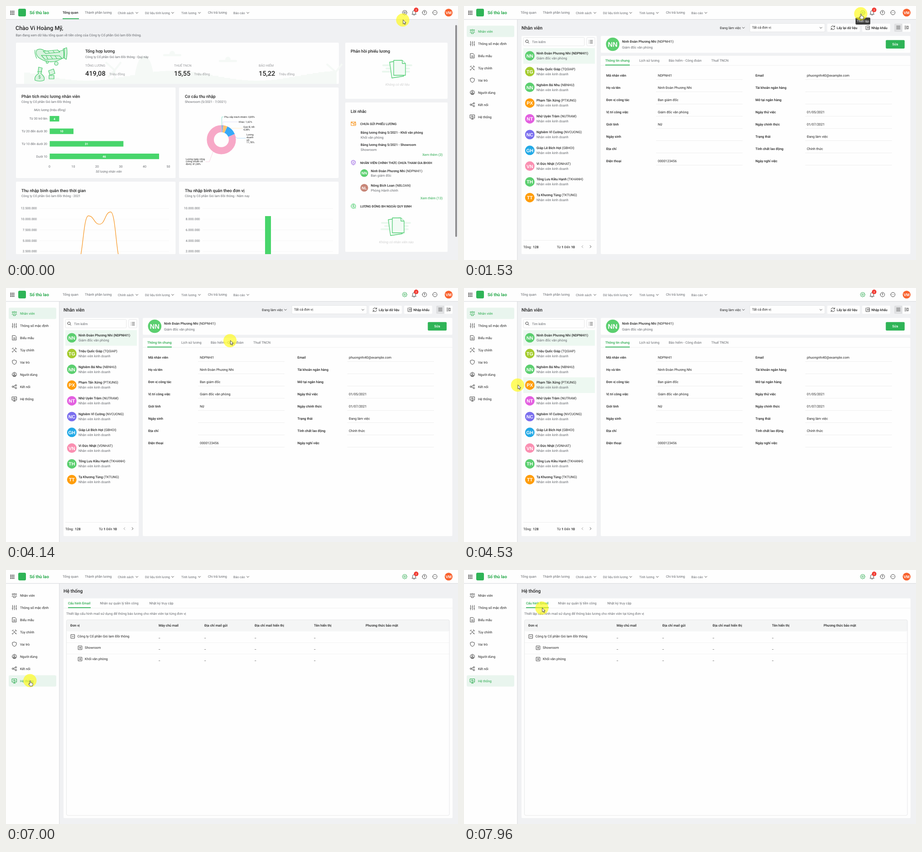
An HTML page for the animation above (8000 ms loop, 998 by 561 pixels).

```html
<!DOCTYPE html>
<html lang="vi">
<head>
<meta charset="utf-8">
<title>Sổ thù lao</title>
<style>
html, body { margin: 0; width: 100%; height: 100%; overflow: hidden; background: #f0f1f3; }
svg { display: block; width: 100vw; height: 100vh; }
text { font-family: Roboto, sans-serif; fill: #232323; text-rendering: geometricPrecision; white-space: pre; }
.m { font-weight: 500; }
.b { font-weight: 700; }
.g { fill: #66696e; }
.l { fill: #98999c; }
.p { fill: #cfcfcf; }
.i { font-style: italic; }
.e { text-anchor: end; }
.c { text-anchor: middle; }
.w { fill: #fff; }
.green { fill: #27a94b; }
.initials { font: bold 1em "Liberation Sans", sans-serif; font-size: inherit; }
.status { font-family: "Open Sans", sans-serif; fill: #3c4043; }
.line { fill: none; stroke: #444; stroke-width: 1; stroke-linecap: round; stroke-linejoin: round; }
.side.active rect, .side.hover rect { fill: #e9f5ee; }
.side rect { fill: none; }
.side.active text { fill: #27a94b; }
.side.active .line, #gear.active { stroke: #27a94b; }
.row { fill: none; }
.row.hover { fill: #edf8f1; }
</style>
</head>
<body>
<svg id="stage" viewBox="0 0 998 561" preserveAspectRatio="none"></svg>
<script>
const GREEN = '#2fb457', MINT = '#48d56b', PAGE = '#f0f1f3', COMPANY = 'Công ty Cổ phần Gió lam Đồi thông';

// Shape helpers; text is placed by the middle of its capitals.
const text = (x, y, s, cls = '', size = 7.4) =>
  `<text x="${x}" y="${(y + size * .355).toFixed(2)}" style="font-size:${size}px" class="${cls}">${s}</text>`;
const rect = (x, y, w, h, fill = '#fefefe', r = 0, extra = '') =>
  `<rect x="${x}" y="${y}" width="${w}" height="${h}" rx="${r}" fill="${fill}" ${extra}/>`;
const disc = (x, y, r, fill, extra = '') => `<circle cx="${x}" cy="${y}" r="${r}" fill="${fill}" ${extra}/>`;
const line = (d, extra = '') => `<path class="line" d="${d}" ${extra}/>`;
const tint = (color, width = 1) => `style="stroke:${color};stroke-width:${width}"`;
const rule = (x1, x2, y, color = '#e4e4e4') => rect(x1, y, x2 - x1, .6, color);
const at = (x, y, body, attrs = '') => `<g transform="translate(${x} ${y})" ${attrs}>${body}</g>`;
const chevron = x => line(`M${x - 2.4} 14l2.4 2.4l2.4-2.4`);
const each = (list, draw) => list.map(draw).join('');
const initials = name => { const w = name.split(' '); return w[0][0] + w.at(-1)[0]; };
const avatar = (x, y, r, fill, name) => disc(x, y, r, fill) + text(x, y + .2, initials(name), 'w c initials', r);
const ring = 'M-4.8 0a4.8 4.8 0 1 0 9.6 0a4.8 4.8 0 1 0-9.6 0';

function header() {
  let dots = '';
  for (let i = 0; i < 9; i++) dots += rect(9.4 + i % 3 * 3.4, 10.5 + (i / 3 | 0) * 3.4, 2.2, 2.2, '#3a3a3a', .5);
  const menus = [[247, 'Chính sách', 289], [307, 'Dữ liệu tính lương', 368], [387, 'Tính lương', 427], [502, 'Báo cáo', 534]];
  let gear = '';
  for (let i = 0; i < 32; i++) {
    const a = i * Math.PI / 16, r = i & 2 ? 4.2 : 5.2;
    gear += `${i ? 'L' : 'M'}${(r * Math.cos(a)).toFixed(2)} ${(r * Math.sin(a)).toFixed(2)}`;
  }
  return rect(0, 29, 998, 1.2, '#dcdde0') + rect(0, 0, 998, 29) + dots + rect(27, 6, 17, 17, GREEN, 3) +
    text(52, 14.8, 'Sổ thù lao', 'b green', 9.5) +
    `<g id="navOn">${text(125, 14.6, 'Tổng quan', 'm')}${rect(125, 27.2, 36, 1.8, GREEN)}</g>` +
    `<g id="navOff">${text(125, 14.6, 'Tổng quan', 'g')}</g>` +
    text(174, 14.6, 'Thành phần lương', 'g') + text(446, 14.6, 'Chi trả lương', 'g') +
    each(menus, ([x, s, c]) => text(x, 15.3, s, 'g', 7.05) + chevron(c)) +
    at(880.3, 14.6, `<path id="gear" class="line" d="${gear}Z M-1.8 0a1.8 1.8 0 1 0 3.6 0a1.8 1.8 0 1 0-3.6 0"/>`) +
    at(901, 15, line('M-4.5 3.3H4.5L3.2 1.3V-1.5a3.2 3.2 0 0 0-6.4 0V1.3Z M-1.2 5h2.4')) +
    disc(905.6, 8.6, 5, '#f0382f') + text(905.6, 8.7, '2', 'w c', 6) +
    at(924, 14.6, line(ring)) + text(924, 14.7, '?', 'c m', 7) +
    at(947, 14.6, line(ring + 'M-2.1 0h.1M0 0h.1M2.1 0h.1')) + avatar(977.3, 14.6, 8.7, '#f9622e', 'Vi Hoàng Mỹ');
}

function sidebar() {
  const items = [
    ['Nhân viên', 'M-1.5-2.8a1.5 1.5 0 1 0 3 0a1.5 1.5 0 1 0-3 0M-5-2.6a1.1 1.1 0 1 0 2.2 0a1.1 1.1 0 1 0-2.2 0M2.8-2.6a1.1 1.1 0 1 0 2.2 0a1.1 1.1 0 1 0-2.2 0M-2.4 4.5V2.5q2.4-3 4.8 0V4.5ZM-5 2.5q0-2 1.8-2M5 2.5q0-2-1.8-2'],
    ['Thông số mặc định', 'M-4-5V0M-4 3V5M0-5V-3M0 0V5M4-5V1M4 4V5M-5.2 1.5h2.4M-1.2-1.5h2.4M2.8 2.5h2.4'],
    ['Biểu mẫu', 'M-4.2-5H1.5L4.2-2.2V5H-4.2ZM-2 0H2M-2 2.5H2'],
    ['Tùy chỉnh', 'M-4.5 4.7L3 -3M4.7 4.7L-3.6-3.6M-5-2.5L-2.5-5M1.8-4.8q2-.8 3 2.8M2 4L4 2M-5 3.2L-3.4 5'],
    ['Vai trò', 'M0-5L4.5-3.3V0Q4 3.5 0 5Q-4 3.5-4.5 0V-3.3Z'],
    ['Người dùng', ring + 'M-1.6-1.4a1.6 1.6 0 1 0 3.2 0a1.6 1.6 0 1 0-3.2 0M-2.6 3V1.6H2.6V3Z'],
    ['Kết nối', 'M-5 0a1.7 1.7 0 1 0 3.4 0a1.7 1.7 0 1 0-3.4 0M1.7-3a1.6 1.6 0 1 0 3.2 0a1.6 1.6 0 1 0-3.2 0M1.7 3a1.6 1.6 0 1 0 3.2 0a1.6 1.6 0 1 0-3.2 0M-1.7-.7L1.8-2.4M-1.7.7L1.8 2.4'],
    ['Hệ thống', 'M-5-4.5H5V2.5H-5ZM-2.5 5H2.5M0 2.5V5M-3-.8H-1.5L-.4-2.8L.8 1L1.6-.8H3']
  ];
  return rect(117, 30, 1.5, 531, '#e3e4e7') + rect(0, 30, 117, 531) + each(items, ([label, icon], i) =>
    `<g class="side">${rect(6, 43.5 + 27 * i, 105, 25, '', 3)}${at(18.5, 56 + 27 * i, line(icon))}${text(31, 56.2 + 27 * i, label)}</g>`);
}

const emptyIcon = (x, y) => at(x, y,
  each([[-34, -8, 66], [-27, -1, 54], [-35, 6, 62]], ([a, b, w]) => rect(a, b - 2, w, 4, '#eaf7ee', 2)) +
  `<g fill="#f2fbf5" stroke="#4fcd72" stroke-width="1.3" stroke-linejoin="round"><path d="M-18-15L8-19L13 16L-13 20Z"/><path d="M-9-19H10L17-12V14H-9Z"/><path d="M10-19V-12H17"/></g>`);

function illustration() {
  const pale = '#f5f9f6';
  const mill = (x, y) => `<path d="M${x} ${y}L${x - 20} ${y - 18}M${x} ${y}L${x + 14} ${y - 18}M${x} ${y}L${x - 15} ${y + 15}M${x} ${y}V172" stroke="${pale}" stroke-width="4"/>`;
  let town = '';
  for (let x = 40; x < 722; x += 13) {
    const h = 7 + 22 * Math.abs(Math.sin(x * 1.7)) ** 2;
    town += rect(x, 172 - h, 13, h, pale);
  }
  const clouds = each([[367, 109], [490, 122]], ([x, y]) => rect(x - 20, y - 3, 40, 5, pale, 2.5) + disc(x, y - 4, 6, pale));
  return `<g>${town}${clouds}${mill(240, 142)}${mill(728, 146)}<path d="M282 172Q288 112 305 110Q323 112 328 172Z" fill="${pale}"/></g>
    <g fill="#d8f3df" stroke="#47c96b" stroke-width="1.2" stroke-linejoin="round">
    <path d="M68 97Q76 93 84 98L104 103L129 97L131 113L113 121Q92 128 72 114Q64 106 68 97Z"/>
    <path d="M126 95L134 92Q136 104 133 118L127 114Q129 104 126 95Z M129 93V115"/>
    <path d="M64 97Q63 106 68 116" fill="none"/>
    <path d="M78 109L118 110L124 116L86 118Z M88 109L93 118M98 110L103 117M108 110L113 117"/>
    <path d="M82 100L114 97L119 102L88 105Z M92 99L96 104M103 98L107 103"/>
    <circle cx="111" cy="127" r="4"/><circle cx="91" cy="124" r="2.5"/>
    <path d="M70 145H79L77 149Q87 157 84 164Q75 168 64 164Q62 155 72 149Z M71 145L72 135L80 137L78 145Z"/>
    <path d="M94 143L105 139L108 149L97 153ZM95 153H106V161H95Z"/></g>` + text(74, 157, '$', 'c green', 9);
}

// Smooth curve with level tangents at every point.
const spline = points => points.reduce((d, [x, y], i) => {
  if (!i) return `M${x} ${y}`;
  const [px, py] = points[i - 1], mid = (px + x) / 2;
  return d + `C${mid} ${py} ${mid} ${y} ${x} ${y}`;
}, '');

function charts() {
  const rows = ['Từ 30 trở lên', 'Từ 20 đến dưới 30', 'Từ 10 đến dưới 20', 'Dưới 10'];
  const bars = each([4, 10, 31, 46], (n, i) => {
    const y = 249 + 27.7 * i;
    return text(91, y, rows[i], 'g e', 7) + rect(96.5, y - 6.1, n * 5.25, 12.2, MINT) + text(96.5 + n * 2.62, y + .2, n, 'w b c', 6.6);
  });
  let start = 0;
  const donut = each([[.85, '#68d4bd'], [1.62, '#a8a5df'], [4.38, '#ffc46e'], [11.78, '#37a9f8'], [81.37, '#f7a8c7']], ([part, color]) => {
    const arc = `<circle r="24.3" pathLength="100" fill="none" stroke="${color}" stroke-width="15.6" stroke-dasharray="${part} 100" stroke-dashoffset="${-start}" transform="rotate(-90)"/>`;
    start += part;
    return arc;
  });
  const labels = [[482, 245, 'Phụ cấp trách nhiệm: 0,85%'], [514, 256, 'Khác: 1,62%'], [524, 267.5, 'Quà lễ, tết:'], [524, 273, '4,38%'],
    [531, 284, 'Lương'], [531, 290, 'doanh'], [531, 295.6, 'số:'], [531, 301, '11,78%'],
    [397, 338, 'Lương ngày công'], [397, 343.5, '(công chuẩn cố'], [397, 349, 'định): 81,38%']];
  const leaders = [['M476.5 263V245H480', '#68d4bd'], ['M479 263V256H512', '#d5d2f0'], ['M484 265L494 270H522', '#ffe2b3'],
    ['M504 286L510 292H529', '#8fcdf9'], ['M457 322L449 344H441', '#f4c6d9']];
  const axis = (x, values, end) => each(values, (v, i) => text(x, 447 + 23.7 * i, v, 'g e', 7) + rule(x + 6, end, 447 + 23.7 * i, '#f2f2f2'));
  const head = (x, y, title, sub) => text(x, y, title, 'm', 9.35) + text(x, y + 12.5, sub, 'g', 7.05);
  return each([[22, 180, 200], [382, 180, 200], [22, 388, 160], [382, 388, 160]], ([x, y, h]) => rect(x, y, 352.5, h, '#fefefe', 2)) +
    head(34, 199.2, 'Phân tích mức lương nhân viên', COMPANY) + text(97, 230, 'Mức lương (triệu đồng)', 'g i c', 7) + bars +
    each([0, 10, 20, 30, 40, 50], n => text(96 + n * 5.25, 355, n, 'g c', 7)) + text(227, 366, 'Số lượng nhân viên', 'g i c', 7) +
    head(395, 199.2, 'Cơ cấu thu nhập', 'Showroom (5/2021 - 7/2021)') + each(leaders, ([d, c]) => line(d, tint(c, .7))) +
    at(475.5, 295.3, donut) + each(labels, ([x, y, s]) => text(x, y, s, '', 5.5)) +
    head(34, 407.2, 'Thu nhập bình quân theo thời gian', COMPANY + ' - 2021') +
    axis(68, ['12.500.000', '10.000.000', '7.500.000', '5.000.000', '2.500.000'], 360) +
    line(spline([[158, 566], [182, 463.3], [206.5, 482], [231, 454.8], [255, 566]]), tint('#f7941d', 1.2)) +
    rect(0, 548, 740, 13, PAGE) +
    head(395, 407.2, 'Thu nhập bình quân theo đơn vị', COMPANY + ' - Năm nay') +
    axis(428, ['10.000.000', '8.000.000', '6.000.000', '4.000.000', '2.000.000'], 722) + rect(572, 464, 13, 84, MINT);
}

function home() {
  const totals = [[175, 'TỔNG LƯƠNG', '419,08', 228], [371, 'THUẾ TNCN', '15,55', 415.5], [558, 'BẢO HIỂM', '15,22', 602.5]];
  const person = (y, color, name, code, unit) => avatar(791, y, 8.6, color, name) +
    text(805.5, y - 5, `<tspan class="m">${name}</tspan> (${code})`) + text(805.5, y + 5.5, unit, 'g');
  return rect(0, 30, 998, 531, PAGE) + text(21, 48.6, 'Chào Vi Hoàng Mỹ,', 'm', 12.5) +
    text(21.5, 64.6, `Bạn đang xem dữ liệu tổng quan về tiền công của ${COMPANY}.`, 'g', 7.35) +
    rect(22, 81, 713, 91, '#fefefe', 2) + illustration() +
    text(175, 99.8, 'Tổng hợp lương', 'm', 9.4) + text(175, 112.3, COMPANY + ' - Quý này', 'g', 7.05) +
    each(totals, ([x, label, n, unit]) => text(x, 131.3, label, 'l', 7.1) + text(x, 148.5, n, 'm', 14.6) + text(unit, 150.8, 'Triệu đồng', 'l', 7.3)) +
    charts() +
    rect(749, 81, 226, 124, '#fefefe', 2) + text(761, 99.8, 'Phản hồi phiếu lương', 'm', 9.2) + emptyIcon(865, 139) + text(864.5, 173.5, 'Không có dữ liệu', 'p i c') +
    rect(749, 213, 226, 330, '#fefefe', 2) + text(761, 232.5, 'Lời nhắc', 'm', 9.2) +
    at(767, 260, line('M-5-4H5V4H-5ZM-5-4L0 0L5-4M1 4V1H6', tint('#f7941d', 1.1))) + text(782, 260.2, 'CHƯA GỬI PHIẾU LƯƠNG', 'm', 7.1) +
    text(783, 279.6, 'Bảng lương tháng 5/2021 - Khối văn phòng', 'm', 7.2) + text(783, 290.6, 'Khối văn phòng', 'g') +
    text(783, 306.8, 'Bảng lương tháng 5/2021 - Showroom', 'm', 7.2) + text(783, 317.8, 'Showroom', 'g') + text(964, 328.3, 'Xem thêm (3)', 'e green') +
    disc(767, 346, 6.8, '#f3edfc') + at(767, 346, line('M0-5L4-3V0Q3.5 3.5 0 5Q-3.5 3.5-4 0V-3ZM0-2V1M0 2.5V2.6', tint('#9056dd'))) +
    text(782, 346.2, 'NHÂN VIÊN CHÍNH THỨC CHƯA THAM GIA BHXH', 'm', 7.1) +
    person(369, '#5bcf6f', 'Ninh Đoàn Phương Nhi', 'NDPNHI1', 'Ban giám đốc') + person(401.5, '#c78678', 'Nông Bích Loan', 'NBLOAN', 'Phòng Hành chính') +
    text(964, 424.3, 'Xem thêm (13)', 'e green') +
    at(767, 442, disc(0, 0, 6.8, '#e6f7eb') + line(ring + 'M3 3L5 5', tint(MINT)) + text(0, 0, '$', 'c green', 7)) +
    text(782, 442.2, 'LƯƠNG ĐÓNG BH NGOÀI QUY ĐỊNH', 'm', 7.1) + emptyIcon(862, 487) + text(862, 521.5, 'Không có nhân viên nào', 'p i c') +
    rect(992, 42, 3.8, 468, '#8c8c8e', 2);
}

const people = [
  ['Ninh Đoàn Phương Nhi', 'NDPNHI1', '#5bcf6f'], ['Triệu Quốc Giáp', 'TQGIAP', '#a5cc2f'], ['Nghiêm Bá Nhu', 'NBNHU', '#5bcf6f'],
  ['Phạm Tấn Xứng', 'PTXUNG', '#ff9d0a'], ['Nhữ Uyên Trâm', 'NUTRAM', '#e35fe0'], ['Nghiêm Vĩ Cường', 'NVCUONG', '#7a6eee'],
  ['Giáp Lê Bích Hợi', 'GBHOI', '#22a9e6'], ['Vi Đức Nhật', 'VDNHAT', '#fa8fb1'], ['Tống Lưu Kiều Hạnh', 'TKHANH', '#5bcf6f'], ['Tạ Khương Tùng', 'TKTUNG', '#ff9d0a']
];
const ROW = 34.8;

function staff() {
  const [lead, code, color] = people[0];
  const left = [['Mã nhân viên', code], ['Họ và tên', lead], ['Đơn vị công tác', 'Ban giám đốc'], ['Vị trí công việc', 'Giám đốc văn phòng'],
    ['Giới tính', 'Nữ'], ['Ngày sinh', ''], ['Địa chỉ', ''], ['Điện thoại', '0000123456']];
  const right = [['Email', 'phuongnhi40@example.com'], ['Tài khoản ngân hàng', ''], ['Mở tại ngân hàng', ''], ['Ngày thử việc', '01/05/2021'],
    ['Ngày chính thức', '01/07/2021'], ['Trạng thái', 'Đang làm việc'], ['Tính chất lao động', 'Chính thức'], ['Ngày nghỉ việc', '']];
  const labels = (x, list, end) => each(list, ([s], i) => text(x, 153 + 27 * i, s, 'm') + rule(x + 110, end, 162.3 + 27 * i));
  const values = (x, list) => each(list, ([, s], i) => text(x, 153 + 27 * i, s));
  const border = 'stroke="#dddee0" stroke-width=".7"';
  const bars = 'M-4-3H4M-4 0H4M-4 3H4';
  const person = ([name, id, fill], i) => {
    const y = 110 + ROW * i;
    return `<rect class="row person" x="131" y="${y - 17}" width="158" height="34.5"/>` + avatar(145.3, y, 10.5, fill, name) +
      text(160, y - 5.6, `<tspan class="m">${name}</tspan> (${id})`, i ? '' : 'm') +
      text(160, y + 5.3, i ? 'Nhân viên kinh doanh' : 'Giám đốc văn phòng', 'g');
  };
  return text(127, 48, 'Nhân viên', 'm', 10.4) + text(565, 48, 'Đang làm việc') + at(617, 33, chevron(0)) +
    rect(631, 38.5, 166, 18.5, '#fefefe', 2, border) + text(636, 47.8, 'Tất cả đơn vị') + at(788, 33, chevron(0)) +
    rect(802, 39, 72, 18, '#fefefe', 2) + at(814.5, 48, line('M-4-1A4 4 0 0 1 3.5-2M4-4.5V-1.8H1.3M4 1A4 4 0 0 1-3.5 2M-4 4.5V1.8H-1.3')) + text(823, 48, 'Lấy lại dữ liệu', 'm') +
    rect(879, 39, 62, 18, '#fefefe', 2) + at(891.5, 48, line('M-2-4H4V4H-4V-4M4 0H-1M1-2L-1 0L1 2')) + text(899.5, 48, 'Nhập khẩu', 'm') +
    rect(950, 39, 18, 18, '#dfe0e2', 2) + at(959, 47.5, line(bars)) + rect(968, 39, 18, 18, '#fefefe', 2) + at(977, 47.5, line('M-4-3H-.5M-4 0H-.5M-4 3H-.5M1.5-3H4V3H1.5Z')) +
    rect(127, 66, 166, 482, '#fefefe', 2) + rect(131.3, 69.5, 134.5, 18.5, '#fefefe', 2, border) + at(139.5, 78.5, line('M-3.5-.5a3 3 0 1 0 6 0a3 3 0 1 0-6 0M1.8 1.8L4 4')) +
    text(150, 79, 'Tìm kiếm', 'g') + rect(271, 69.5, 18, 18.5, '#fefefe', 2, border) + at(280, 79, line('M-1.5-3H4M-1.5 0H4M-1.5 3H4M-4-3H-3.8M-4 0H-3.8M-4 3H-3.8')) +
    rule(131, 289, 517) + text(131, 532, 'Tổng:') + line('M262.5 529l-2.4 2.5l2.4 2.5', tint('#999')) + line('M278.3 529l2.4 2.5l-2.4 2.5') +
    `<g id="list">${each(people, person)}${text(152, 532, '128', 'm')}${text(205, 532, 'Từ <tspan class="b">1</tspan> Đến <tspan class="b">10</tspan>')}</g>` +
    rect(302, 66, 683.5, 37.5, '#fefefe', 2) + rect(931.3, 75.3, 41.6, 18.6, GREEN, 2) + text(952, 84.8, 'Sửa', 'w c m') +
    rect(302, 110, 683.5, 438, '#fefefe', 2) + rule(302, 985.5, 130.8) + text(312, 120, 'Thông tin chung', 'm green') + rect(312, 129.5, 54, 1.8, GREEN) +
    text(387, 120, 'Lịch sử lương', 'g') + text(452, 120, 'Bảo hiểm - Công đoàn', 'g') + text(546, 120, 'Thuế TNCN', 'g') +
    labels(314, left, 615) + labels(643.5, right, 945) +
    `<g id="detail">${avatar(328.3, 84.5, 14.8, color, lead)}${text(349, 78, `<tspan class="m">${lead}</tspan> (${code})`)}${text(349, 91, 'Giám đốc văn phòng', 'g')}${values(428, left)}${values(757, right)}</g>`;
}

function system() {
  const columns = [[142, 'Đơn vị'], [337, 'Máy chủ mail'], [438, 'Địa chỉ mail gửi'], [549, 'Địa chỉ mail hiển thị'], [680, 'Tên hiển thị'], [794, 'Phương thức bảo mật']];
  const rows = [[147.5, COMPANY, ''], [163.7, 'Showroom', 'M0-2V2'], [163.7, 'Khối văn phòng', 'M0-2V2']];
  return text(127, 46.2, 'Hệ thống', 'm', 10.4) + rect(127, 62.5, 859, 485.5, '#fefefe', 2) + rule(127, 986, 83.8) +
    text(137, 73, 'Cấu hình Email', 'm green') + rect(137, 82.3, 50, 1.8, GREEN) +
    text(207.5, 73, 'Nhân sự quản lý tiền công', 'g') + text(316.5, 73, 'Nhật ký truy cập', 'g') +
    text(133, 96, 'Thiết lập cấu hình mail sử dụng để thông báo lương cho nhân viên tại từng đơn vị', 'g') +
    `<g id="table">${rect(133.5, 110, 845.5, 25.5, '#f4f5f5', 3)}${each(columns, ([x, s]) => text(x, 122.3, s, 'm'))}` +
    each(rows, ([x, s, plus], i) => {
      const y = 146.8 + 25 * i;
      return `<rect class="row unit" x="134" y="${y - 11.3}" width="845" height="24.6"/>` + at(x, y, line('M-4-4H4V4H-4ZM-2 0H2' + plus)) +
        text(x + 10.3, y, s) + (i < 2 ? rule(134, 979, y + 13.4, '#ececec') : '') + each(columns.slice(1, 5), ([c]) => text(c, y + .5, '_'));
    }) + `</g><path id="spinner" fill="none" stroke="${GREEN}" stroke-width="1.9" d="M-8.4-10A13 13 0 0 0-8.4 10"/>` +
    rect(133.5, 110, 845.5, 432, 'none', 3, 'stroke="#e0e1e3" stroke-width=".8"');
}

document.getElementById('stage').innerHTML = rect(0, 0, 998, 561, PAGE) +
  `<g id="app">${sidebar()}<g id="staff">${staff()}</g><g id="system">${system()}</g></g><g id="home">${home()}</g>` + header() +
  `<g id="status">${rect(0, 547, 332, 14, '#dee1e6')}${text(3, 554.2, 'Waiting for amisapp.misa.vn...', 'status', 6.95)}</g>` +
  `<g id="tooltip">${rect(864.5, 25.5, 32.5, 15.5, '#3b3b3b', 2)}${text(880.8, 33.3, 'Thiết lập', 'w c', 7)}</g>
  <g id="pointer"><circle r="14.6" fill="#fffb14" opacity=".66"/><g fill="#fff" stroke="#222" stroke-width=".8" stroke-linejoin="round">
  <path id="arrow" d="M.8-.5V8.6L2.9 6.8L4.3 10L5.8 9.3L4.4 6.3H7.2Z"/>
  <path id="hand" d="M-.6 1Q.5-.4 1.5 1V5Q2.6 4.2 3.3 5.3Q4.4 4.7 4.9 5.8Q6.2 5.4 6.3 6.7V9.3L5.3 12H-.1L-2.8 8Q-3.3 6.4-1.7 6.9L-.6 8Z"/></g></g>`;

const $ = id => document.getElementById(id);
const all = selector => [...document.querySelectorAll(selector)];
const sides = all('.side'), persons = all('.person'), units = all('.unit');
const show = (id, on) => { $(id).style.display = on ? '' : 'none'; };

// Start and end time, start point, bend, end point.
const moves = [
  [0, 430, [876, 31], [876, 24], [876, 17]],
  [3720, 4560, [876, 17], [496, 116], [116, 215]],
  [4560, 5080, [116, 215], [85, 235], [50, 245]],
  [6940, 7790, [50, 245], [165, 215], [171, 96]],
  [7790, 7970, [171, 96], [171, 90], [172, 84]]
];
function pointerAt(t) {
  const [from, to, a, b, c] = moves.findLast(m => t >= m[0]) || moves[0];
  const u = (1 - Math.cos(Math.PI * Math.min(1, Math.max(0, (t - from) / (to - from))))) / 2;
  return a.map((v, i) => v * (1 - u) ** 2 + 2 * b[i] * u * (1 - u) + c[i] * u * u);
}
const sideAt = ([x, y]) => x > 6 && x < 111 && y > 43 ? Math.floor((y - 42.5) / 27) : -1;
const personAt = ([x, y]) => x > 131 && x < 289 ? Math.floor((y - 93) / ROW) : -1;
const unitAt = ([x, y]) => x > 134 && y > 135.5 ? Math.floor((y - 135.5) / 25) : -1;
const onGear = ([x, y]) => x > 868 && x < 892 && y < 24;
const mark = (list, name, index) => list.forEach((el, i) => el.classList.toggle(name, i === index));

function draw(t) {
  const isHome = t < 850, isStaff = !isHome && t < 5420, isSystem = t >= 5420, loaded = t >= 5840;
  const now = pointerAt(t), late = pointerAt(t - 100);
  show('home', isHome); show('navOn', isHome); show('navOff', !isHome);
  show('staff', isStaff); show('list', t >= 1420); show('detail', t >= 1510);
  show('system', isSystem); show('table', loaded); show('spinner', !loaded);
  show('status', t >= 530 && t < 1100 || t >= 5250 && !loaded);
  show('tooltip', t > 300 && onGear(late));
  $('gear').classList.toggle('active', !isHome);
  mark(sides, 'active', isSystem ? 7 : 0);
  mark(sides, 'hover', sideAt(late));
  mark(persons, 'hover', personAt(late));
  persons[0].classList.add('hover');
  mark(units, 'hover', unitAt(late));
  $('spinner').setAttribute('transform', `translate(556 326) rotate(${(t - 5420) * .36})`);
  const hand = onGear(now) || !isHome && sideAt(now) >= 0 || isStaff && personAt(now) >= 0;
  show('hand', hand); show('arrow', !hand);
  $('pointer').setAttribute('transform', `translate(${now.map(v => v.toFixed(2)).join(' ')})`);
}
const begin = performance.now();
function tick() {
  draw((performance.now() - begin) % 8000);
  requestAnimationFrame(tick);
}
tick();
</script>
</body>
</html>
```
